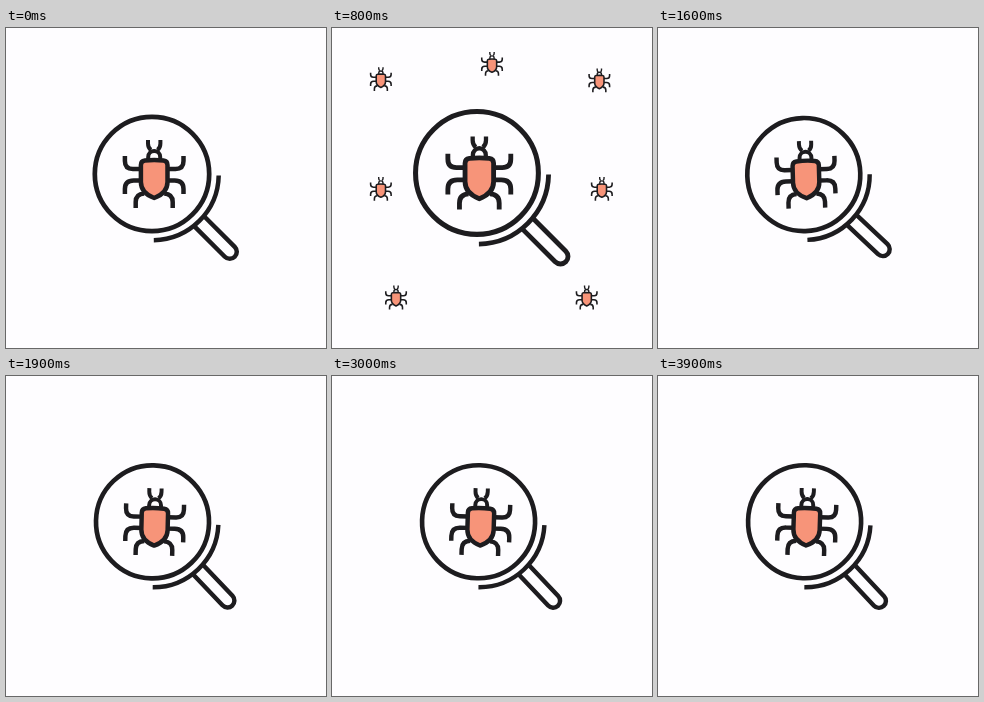
An HTML page for the animation above (4000 ms loop, 320x320 px).

```html
<!DOCTYPE html>
<html lang="en">
<head>
<meta charset="utf-8">
<title>Bug search</title>
<style>
  html, body { margin: 0; width: 100%; height: 100%; overflow: hidden; background: #fefdff; }
  svg { display: block; width: 100vw; height: 100vh; }
</style>
</head>
<body>
<svg viewBox="0 0 320 320" fill="none" stroke="#1d1c1f" stroke-width="4.5">
  <defs>
    <g id="legs">
      <path d="M-29.3 -19v5q0 8 8 8h8M-13 5.5h-7.5q-8.8 0 -8.8 8.5v5M-10 18.5q-8.5 .5 -8.5 8.5v6"/>
      <path d="M-6.2 -35v3.5q0 4.5 3 6.5" stroke-width="4"/>
    </g>
    <g id="bug">
      <use href="#legs"/>
      <use href="#legs" transform="scale(-1 1)"/>
      <path d="M-6 -14v-4a6 6 0 0 1 12 0v4" fill="#fefdff" stroke-width="4"/>
      <path d="M-13.3 -10q0 -4 4 -4.5q9.3 -1 18.6 0q4 .5 4 4.5v17q0 11 -13.3 16q-13.3 -5 -13.3 -16z" fill="#f79479" stroke-linejoin="round"/>
    </g>
  </defs>
  <g id="swarm"></g>
  <g id="glass">
    <circle cx="146" cy="146" r="57.2" stroke-width="4.7" fill="#fefdff"/>
    <path d="M212.7 147.5A66 66 0 0 1 147.8 212.2"/>
    <path d="M66 -7H110a7 7 0 0 1 0 14H66" transform="translate(146 146) rotate(45)"/>
    <use href="#bug" x="148.2" y="147"/>
  </g>
</svg>
<script>
  const LOOP = 4000, CENTER = 160;
  const glass = document.getElementById('glass');
  const swarm = document.getElementById('swarm');
  const starts = [[72, 74], [160, 62], [245, 75], [72, 161], [247, 161], [84, 247], [235, 247]];
  const bugs = starts.map(() => {
    const bug = document.createElementNS('http://www.w3.org/2000/svg', 'use');
    bug.setAttribute('href', '#bug');
    return swarm.appendChild(bug);
  });

  const progress = (t, from, to) => Math.min(1, Math.max(0, (t - from) / (to - from)));
  const smooth = p => p * p * (3 - 2 * p);

  function draw(t) {
    const size = 1 + 0.09 * smooth(progress(t, 0, 600)) - 0.102 * smooth(progress(t, 650, 1250));
    const tilt = t < 1300 ? 0 : -1.8 * Math.sin(2 * Math.PI * (t - 1300) / 940);
    glass.setAttribute('transform',
      `translate(${CENTER} ${CENTER}) rotate(${tilt}) scale(${size}) translate(${-CENTER} ${-CENTER})`);

    const spread = 1 + 0.3 * (1 - (1 - progress(t, 500, 1100)) ** 3);
    const scale = 0.35 * smooth(progress(t, 465, 640)) * (1 - smooth(progress(t, 800, 1220)));
    swarm.style.display = scale > 0 ? '' : 'none';
    bugs.forEach((bug, i) => {
      const [x, y] = starts[i].map(v => CENTER + (v - CENTER) * spread);
      bug.setAttribute('transform', `translate(${x} ${y}) scale(${scale})`);
    });
  }

  function tick() {
    draw(performance.now() % LOOP);
    requestAnimationFrame(tick);
  }
  tick();
</script>
</body>
</html>
```
